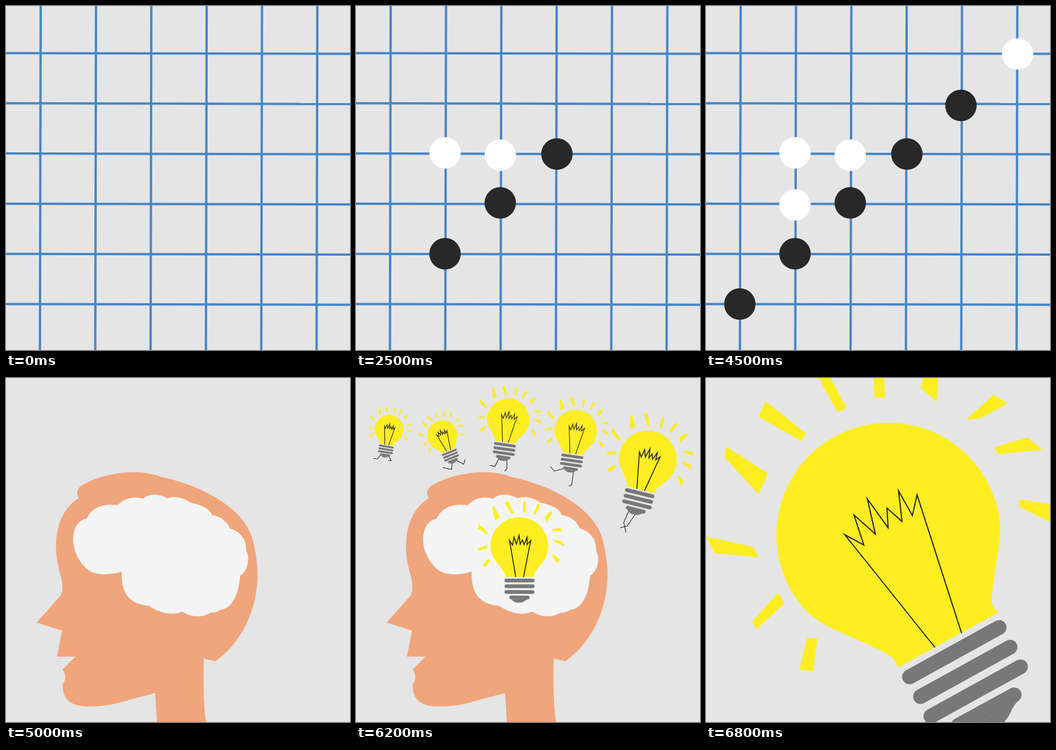
These frames come from a looping animation (595x595 px, 7.3 s). An HTML page:

```html
<!DOCTYPE html>
<html lang="en">
<head>
<meta charset="utf-8">
<title>Ideas</title>
<style>
  html, body { margin: 0; width: 100%; height: 100%; overflow: hidden; background: #e5e5e5; }
  svg { display: block; width: 100vw; height: 100vh; }
  .grid { stroke: #4686c8; stroke-width: 4; }
  .glow { fill: #fdee21; }
  .base { fill: #787878; }
  .rings { fill: none; stroke: #787878; stroke-width: 25.5; stroke-linecap: round; }
  .wire, .legs { fill: none; stroke: #222; vector-effect: non-scaling-stroke; stroke-miterlimit: 10; }
  .legs { stroke-width: 1.1; }
</style>
</head>
<body>
<svg viewBox="0 0 595 595">
  <defs>
    <g id="bulb">
      <path class="glow" d="M332 501Q328 489 322 483C300 468 255 450 222 435Q196 423 175 405A194 194 0 1 1 509 255C510 290 497 330 494 388Q497 398 505 406Z"/>
      <path class="glow" d="M174 450H193L185 508 162 504Z M125 371L135 390 87 435 80 421Z M0 274L81 292 91 310 15 303Z
        M34 118L107 165 91 201 32 137Z M103 40L173 96 165 109 91 67Z M193 -3L209 -11 243 51 228 60Z
        M286 -40H305L310 34H292Z M387 -40L402 -28 399 41 371 17Z M450 72L497 29 522 44 474 70Z
        M499 120L556 103 582 124 505 132Z M543 210L599 219 597 250 541 222Z"/>
      <path class="wire" d="M396 466L240 271 273 289 256 237 293 270 279 209 315 259 313 225 339 248 333 195 357 238 365 202 442 441"/>
      <path class="rings" d="M352 517L507 431.500M371 551L526 465.500M389 585L544 499.500M436 601L533 548"/>
      <path class="base" d="M539 559Q531 568 526 580 519 594 510 599L484 614Q472 620 442 612Z"/>
    </g>
  </defs>
  <g id="board"></g>
  <g id="head">
    <path fill="#f0a57b" d="M126 208C122 200 122 195 127 189C150 170 220 152 268 171C340 186 414 226 427 281C432 300 435 320 435 340C435 400 408 458 362 490L342 485C341 530 342 570 346 595H261L258 545 182 565Q165 568 145 568C118 569 97 560 98 530Q107 517 98 504L120 482H88L97 437 53 423 93 378Q100 371 96 347C88 320 85 300 87 278C90 245 105 220 126 208Z"/>
    <path fill="#f4f4f4" d="M140 243C146 228 162 216 193 220C203 209 220 203 237 209C246 200 264 199 279 208C294 203 308 208 320 216C340 220 352 226 356 237C370 239 382 247 387 260C404 265 416 278 415 296C416 303 419 304 419 312C418 328 414 336 405 342C402 375 392 398 371 401Q364 406 354 406C338 416 318 413 305 404C290 411 268 408 247 394C215 391 199 375 200 335C180 341 155 342 142 332C125 318 116 298 116 278C117 260 124 246 140 243Z"/>
  </g>
  <use id="big" href="#bulb" stroke-width="2"/>
</svg>
<script>
const LOOP = 7300, BOARD_END = 5000, HEAD_END = 6800;
const parts = [];
const find = id => document.getElementById(id);

function add(parent, tag, attrs) {
  const el = document.createElementNS('http://www.w3.org/2000/svg', tag);
  for (const key in attrs) el.setAttribute(key, attrs[key]);
  return parent.appendChild(el);
}

function show(el, from, to) {
  parts.push({ el, from, to });
}

const board = find('board'), head = find('head');

for (let i = 0; i < 6; i++) {
  const x = 60 + 95.7 * i, y = 81.5 + 86.8 * i;
  add(board, 'line', { class: 'grid', x1: x, y1: 0, x2: x - 1.3, y2: 595 });
  add(board, 'line', { class: 'grid', x1: 0, y1: y, x2: 595, y2: y + 1.3 });
}

// Stones alternate black and white, one every 500 ms
const stones = [
  [347.5, 256], [249.5, 258], [249.5, 340.5], [154, 254], [154, 428.5],
  [154, 344], [441, 172], [539, 83], [58.5, 515.5]
];
stones.forEach(([cx, cy], i) => {
  const stone = add(board, 'circle', { cx, cy, r: 27.2, fill: i % 2 ? '#fff' : '#282828' });
  show(stone, 500 * (i + 1), BOARD_END);
});

// Globe centre, globe radius, tilt, legs; one every 200 ms
const bulbs = [
  [282.5, 290.7, 49.8, 0, ''],
  [57, 89, 25, 9, 'M44 131L37 140 30 139M55 132L61 143H56'],
  [149.5, 99.5, 26.3, -22, 'M166 145L165.500 158 150 155M173 142L186 149 189 141'],
  [263.3, 72, 36.7, 7.7, 'M249 136L240 153 232 151M261 138V157L257 161'],
  [380, 92, 36.7, 8, 'M365 155L343 161 336 153M377 157L373 185 368 187'],
  [504.5, 141, 50, 13.6, 'M474 225L463 250 467 267M487 230L469 256 457 259'],
  [525, 342, 50, 10.7, 'M500 428L461 432 478 441M519 431L549 453H535'],
  [454.5, 506, 40.3, 11, 'M431 574L419 599M446 577L474 598 485 588']
];
bulbs.forEach(([x, y, r, tilt, legs], i) => {
  const group = add(head, 'g', {});
  if (legs) add(group, 'path', { class: 'legs', d: legs });
  add(group, 'use', {
    href: '#bulb',
    'stroke-width': r > 45 ? 1.6 : 1.1,
    transform: `translate(${x} ${y}) rotate(${29 + tilt}) scale(${r / 194}) translate(-316 -272)`
  });
  show(group, 5200 + 200 * i, HEAD_END);
});

show(board, 0, BOARD_END);
show(head, BOARD_END, HEAD_END);
show(find('big'), HEAD_END, LOOP);

const start = performance.now();

function draw() {
  const t = (performance.now() - start) % LOOP;
  for (const { el, from, to } of parts) {
    el.style.display = t >= from && t < to ? '' : 'none';
  }
  requestAnimationFrame(draw);
}
draw();
</script>
</body>
</html>
```
